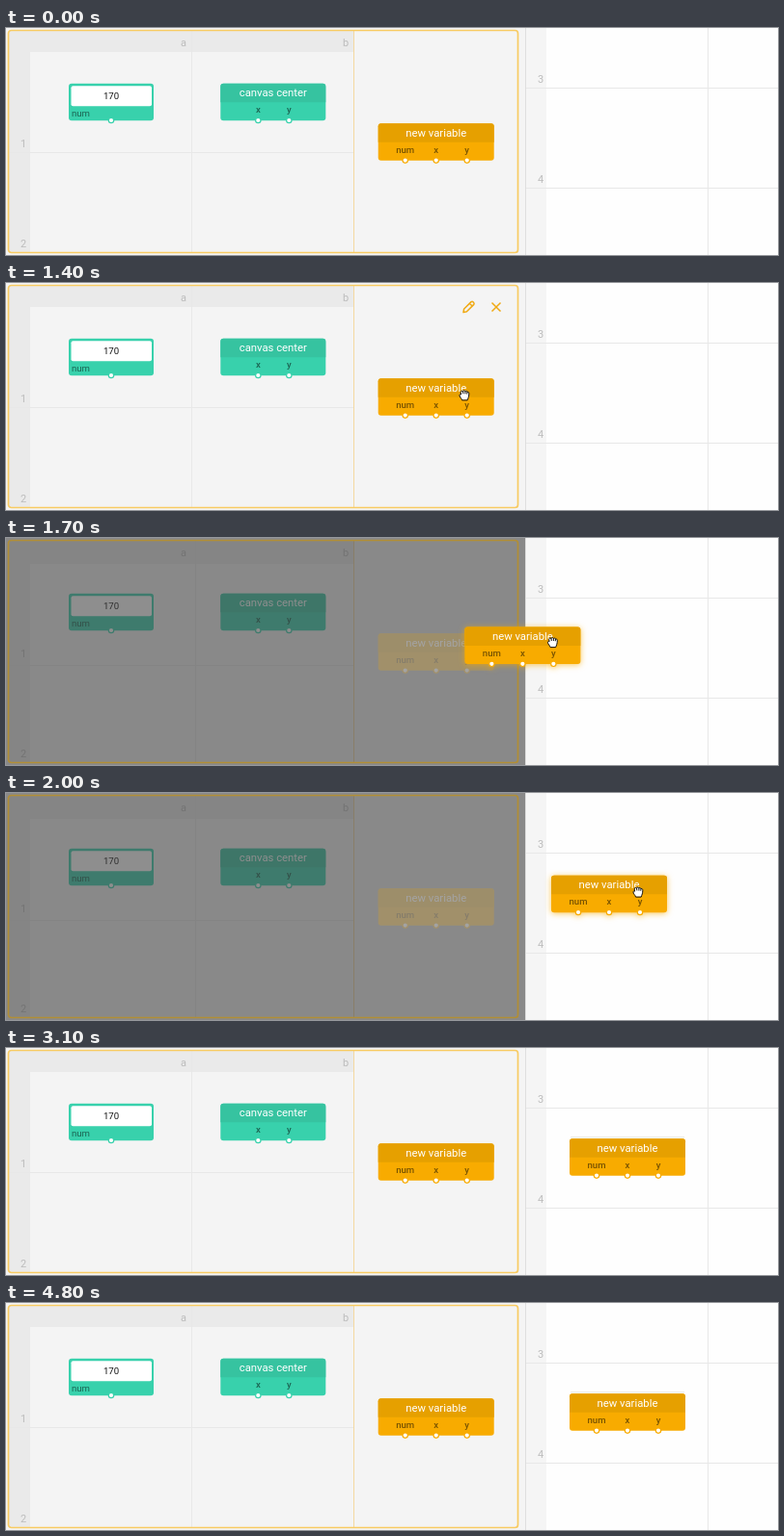
Write an HTML page that moves like this. It is 800x236 px and loops after 4900 ms.

```html
<!DOCTYPE html>
<html lang="en">
<head>
<meta charset="utf-8">
<title>Dragging a variable onto the sheet</title>
<style>
  html, body { margin: 0; width: 100%; height: 100%; overflow: hidden; background: #fff; }
  svg { display: block; width: 800px; height: 236px; }
  text { font-family: Roboto, Arial, sans-serif; text-anchor: middle; }
  .axis { font-size: 11px; fill: #bcbcbc; }
  .title { font-size: 11.3px; fill: #fff; }
  .port { font-size: 9.6px; font-weight: 500; fill: #000; fill-opacity: .52; }
  .value { font-size: 9.6px; fill: #111; }
  .line { stroke: #e8e8e8; fill: none; }
  .icon { stroke: #f0aa14; stroke-width: 1.5; fill: none; stroke-linejoin: round; }
  .hand { fill: #fff; stroke: #111; stroke-width: 1; stroke-linejoin: round; stroke-linecap: round; }
</style>
</head>
<body>
<svg viewBox="0 0 800 236">
  <defs>
    <filter id="glow" x="-20%" y="-40%" width="140%" height="190%">
      <feDropShadow dx="0" dy="1" stdDeviation="3" flood-color="#f7aa00" flood-opacity=".65"/>
    </filter>
  </defs>

  <!-- sheet on the right -->
  <rect x="538" width="262" height="236" fill="#fefefe"/>
  <rect x="538" width="22" height="236" fill="#f5f5f5"/>
  <path class="line" d="M538 62.5H800M538 166.5H800M727.5 0V236"/>
  <text class="axis" x="554" y="57">3</text>
  <text class="axis" x="554" y="161">4</text>

  <!-- editor panel -->
  <rect width="538" height="236" fill="#f4f4f4"/>
  <rect x="3" y="3" width="22" height="231" fill="#eaeaea"/>
  <rect id="header" x="3" y="3" width="357" height="22" fill="#eaeaea"/>
  <path id="grid" class="line"/>
  <path d="M360.5 3V234" stroke="#f4d9a0"/>
  <text class="axis" x="184" y="19">a</text>
  <text class="axis" x="352" y="19">b</text>
  <text class="axis" x="18" y="124">1</text>
  <text class="axis" x="18" y="228">2</text>
  <g id="panelNodes"></g>
  <g id="icons" class="icon">
    <path d="M474 30.5L474.6 27L482 19.6Q483.2 18.8 484.4 20Q485.6 21.3 484.8 22.4L477.4 29.8ZM480.4 21.2L483.2 24"/>
    <path d="M503.5 20.5L512.5 29.5M512.5 20.5L503.5 29.5"/>
  </g>
  <rect id="dim" width="538" height="236" fill="#444" fill-opacity=".6"/>
  <path d="M538.5 0V236" stroke="#dedede"/>
  <rect id="border" x="2.5" y="2.5" width="528" height="231" rx="3" fill="none" stroke-width="1.7"/>

  <g id="home"></g>
  <g id="copy"></g>

  <g id="cursor" class="hand">
    <path id="openHand" d="M-2.6 5.5C-3 3.5-6 1.4-6 0C-5.6-1.4-4.2-.7-3.4.4L-4.6-3.4C-4.6-5-3-5-2.6-3.6L-2.1-5C-1.8-6.4-.2-6.4 0-5L.3-4.6C.8-6 2.2-5.6 2.3-4.2L2.5-3C3.2-4.2 4.6-3.6 4.5-2.2C4.6 1 4 2.5 3.2 5.5ZM-2.6-3.6L-1.7-.6M0-5L.3-.8M2.3-4.2V-.6"/>
    <path id="fist" d="M-2.5 5.5C-2.8 3.8-5.2 2.6-5 .6C-4.9-.5-3.8-.5-3.4 0L-3.8-2.4C-3.6-4.2-2-4-1.5-3.2C-1-4.6.6-4.4.9-3.2C1.6-4.2 2.8-3.7 3-2.6C4-3.2 4.9-2.3 4.8-1C4.8 2 4 3.4 3.3 5.5ZM-1.5-3.2L-1.2-1.2M.9-3.2V-1.1M3-2.6L2.8-.9"/>
  </g>
</svg>

<script>
const LOOP = 4900, STEP = 100;
const $ = id => document.getElementById(id);

const GREEN = { body: '#38d1ac', head: '#36c3a0' };
const ORANGE = { body: '#f8ab00', head: '#e6a000' };

const portDot = (x, color) =>
  `<circle cx="${x}" cy="38.3" r="2.7" fill="#fff" stroke="${color}" stroke-width="1.2"/>`;

function node(title, width, ports, { body, head }) {
  const parts = ports.map(([name, x]) =>
    `<text class="port" x="${x}" y="30.3">${name}</text>` + portDot(x, body)).join('');
  return `<rect width="${width}" height="38.5" rx="3" fill="${body}"/>
    <path d="M0 19.5V3Q0 0 3 0H${width - 3}Q${width} 0 ${width} 3V19.5Z" fill="${head}"/>
    <text class="title" x="${width / 2}" y="13.5">${title}</text>${parts}`;
}

const numberNode = `<rect width="88" height="38.5" rx="3" fill="${GREEN.body}"/>
  <rect x="2.5" y="2.5" width="83.5" height="21" rx="2" fill="#fff"/>
  <text class="value" x="44" y="16.7">170</text>
  <text class="port" x="12.5" y="34.3" style="font-weight:400">num</text>${portDot(44, GREEN.body)}`;
const variable = node('new variable', 120, [['num', 28], ['x', 60], ['y', 92]], ORANGE);

$('panelNodes').innerHTML =
  `<g transform="translate(65 57.7)">${numberNode}</g>
   <g transform="translate(222.3 57.7)">${node('canvas center', 109, [['x', 39], ['y', 71]], GREEN)}</g>`;
$('home').innerHTML = variable;
$('copy').innerHTML = '<path id="slot" d="M1 -1.5H119" stroke="#e6e6e6"/>' + variable;

const place = (el, [x, y]) => el.setAttribute('transform', `translate(${x} ${y})`);
const show = (el, on) => el.style.display = on ? '' : 'none';
const smooth = p => p * p * (3 - 2 * p);

// Each entry: time, x, y
const cursorPath = [[800, 516, 181], [1300, 475, 116], [1400, 475, 116], [1500, 478, 114],
  [1900, 655, 101.5], [2100, 655, 103], [2200, 656, 110], [2400, 664, 236]];
const dragPath = [[1500, 385.7, 99.3], [1900, 565, 85.7], [2000, 565, 85.7]];

function along(path, t) {
  let i = 1;
  while (i < path.length - 1 && t > path[i][0]) i++;
  const [t0, x0, y0] = path[i - 1], [t1, x1, y1] = path[i];
  const p = smooth(Math.min(1, Math.max(0, (t - t0) / (t1 - t0))));
  return [x0 + (x1 - x0) * p, y0 + (y1 - y0) * p];
}

place($('home'), [385.7, 99.3]);

function draw(t) {
  const dragging = t >= 1500 && t < 2100;
  const dropped = t >= 2100;
  const [col, row, top] = dragging ? [196.5, 132.5, 27] : [192.5, 129.5, 25];

  $('header').setAttribute('height', top - 3);
  $('grid').setAttribute('d', `M${col} 3V234M3 ${row}H360`);
  $('border').setAttribute('stroke', dragging ? '#b18e36' : '#f8cb62');
  show($('dim'), dragging);
  show($('icons'), t >= 800 && t < 1500);
  $('home').style.opacity = dragging ? .22 : 1;

  show($('copy'), dragging || dropped);
  show($('slot'), dropped);
  place($('copy'), dropped ? [584, 94.3] : along(dragPath, t));
  if (dragging) $('copy').setAttribute('filter', 'url(#glow)');
  else $('copy').removeAttribute('filter');

  const gripping = t >= 1400 && t < 2100;
  show($('cursor'), t >= 800 && t < 2400);
  show($('fist'), gripping);
  show($('openHand'), !gripping);
  place($('cursor'), along(cursorPath, t));
}

const start = performance.now();
function tick() {
  const t = (performance.now() - start) % LOOP;
  draw(Math.floor(t / STEP) * STEP);
  requestAnimationFrame(tick);
}
tick();
</script>
</body>
</html>
```
